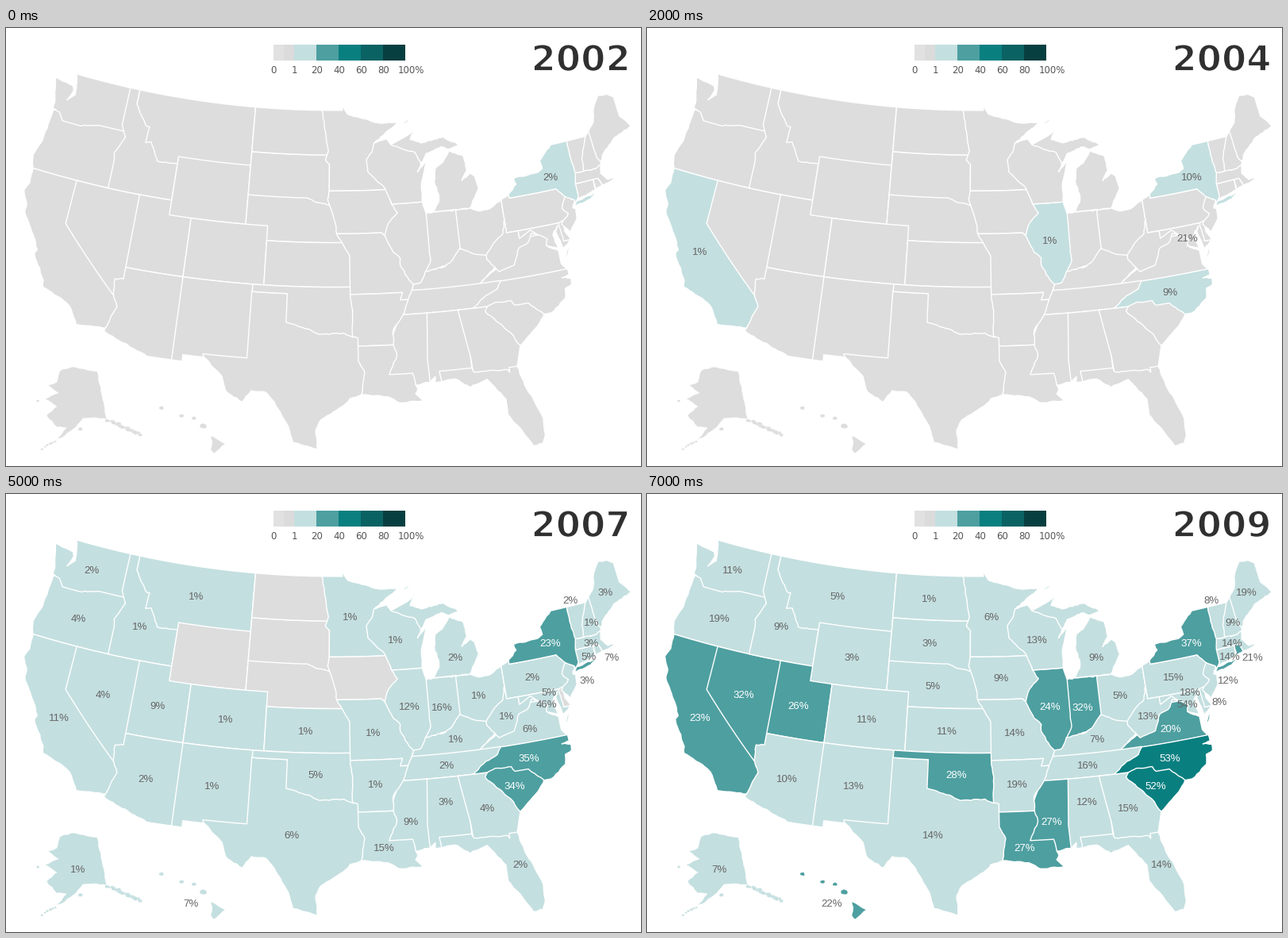
Recreate the animation shown at these times as a matplotlib script. Size 800 by 552 pixels, loop 8000 ms.

```python
import numpy as np
import matplotlib.pyplot as plt
from matplotlib.animation import FuncAnimation
from matplotlib.patches import Polygon, Rectangle
from matplotlib.patheffects import Normal, Stroke

W, H, DPI = 800, 552, 80
PX = 72 / DPI
YEARS = range(2002, 2010)
GREY = '#dddddd'
TEALS = ['#c4dfe0', '#4e9fa0', '#0a7f80', '#0a6263', '#073f40']
DARK_LABELS = {'RI', 'HI', 'DC'}

rng = np.random.default_rng(4)
fig = plt.figure(figsize=(W / DPI, H / DPI), dpi=DPI, facecolor='white')
ax = fig.add_axes([0, 0, 1, 1])
ax.set_xlim(0, W)
ax.set_ylim(H, 0)
ax.axis('off')

shapes, labels, shares = {}, {}, {}


def albers(west, lat):
    """Equal-area conic projection of degrees to stage pixels."""
    a, b = np.sin(np.radians([29.5, 45.5]))
    n = (a + b) / 2
    rho = np.sqrt(1 - a * a + 2 * n * a - 2 * n * np.sin(np.radians(lat))) / n
    theta = n * np.radians(96 - west)
    return 413.3 + 1060 * rho * np.sin(theta), -1064.2 + 1060 * rho * np.cos(theta)


def trace(points, unit, rough):
    """Subdivide an outline; sloping edges (coasts, rivers) become slightly ragged."""
    out = []
    for a, b in zip(points, np.roll(points, -1, 0)):
        n = 1 + int(np.hypot(*(b - a)) / (0.3 * unit))
        edge = a + (b - a) * np.arange(n)[:, None] / n
        if rough and (a != b).all():
            edge[1:] += rng.uniform(-0.04, 0.04, (n - 1, 2)) * unit
        out.append(edge)
    return np.vstack(out)


def land(name, *pts, flat=False, rough=True, edge=1.4):
    p = trace(np.reshape(pts, (-1, 2)).astype(float), 18 if flat else 1, rough)
    if not flat:
        p = np.column_stack(albers(p[:, 0], p[:, 1]))
    patch = Polygon(p, closed=True, ec='white', lw=edge * PX, joinstyle='round',
                    zorder=1 + len(ax.patches) / 1000)
    shapes.setdefault(name, []).append(ax.add_patch(patch))


def islet(name, x, y, r):
    turn = np.arange(0, 2 * np.pi, 0.9)
    rim = r * rng.uniform(0.75, 1.2, turn.size)
    pts = np.column_stack([x + rim * np.cos(turn), y + 0.75 * rim * np.sin(turn)])
    land(name, *pts.ravel(), flat=True, edge=0.2)


def chain(name, start, end, count, r):
    for t in np.linspace(0, 1, count):
        x, y = np.array(start) * (1 - t) + np.array(end) * t + rng.uniform(-1, 1, 2)
        islet(name, x, y, r * rng.uniform(0.7, 1.3))


def state(name, at, values, *pts, **kw):
    """Label position, the latest yearly shares, then the outline."""
    shares[name] = (0,) * (len(YEARS) - len(values)) + values
    labels[name] = ax.text(at[0], at[1] + 4.7, '', ha='center', va='baseline',
                           family='Liberation Sans', size=13.3 * PX, zorder=5)
    if pts:
        land(name, *pts, **kw)


def box(west, east, north, south):
    return west, north, east, north, east, south, west, south


# Outlines in degrees west and north; each state runs under those drawn after it.
state('OR', (91, 156), (4, 8, 19), 124.2, 42, 124.55, 42.85, 124.1, 44, 123.95, 46.2, 123.4, 46.3,
      116.5, 46.05, 116.5, 42)
state('WA', (108, 95), (2, 6, 11), 122.76, 49, 122.5, 48.5, 122.3, 47.6, 122.95, 47.1, 122.55, 47.9,
      122.75, 48.15, 124.72, 48.38, 124.1, 46.9, 124.05, 46.3, 123.3, 46.15, 122.8, 45.65,
      121.1, 45.65, 119, 46, 116.5, 46, 116.5, 49)
state('CA', (67, 281), (1, 4, 7, 11, 16, 23), 124.2, 42, 124.1, 41, 124.4, 40.4, 123.8, 39.6,
      123.75, 39, 122.5, 37.7, 121.8, 36.8, 121.95, 36.5, 120.62, 34.9, 120.5, 34.45, 118.8, 34.02,
      118, 33.65, 117.12, 32.53, 114.72, 32.72, 114.1, 34.3, 114.1, 35.5, 119.5, 42)
state('NV', (122, 252), (4, 11, 32), 120, 42, 114, 42, 114, 35.5, 114.63, 35, 120, 39, rough=False)
state('MT', (240, 128), (1, 3, 5), *box(116.05, 104.05, 49, 44.3))
state('ID', (169, 166), (1, 4, 9), 117.04, 49, 116.05, 49, 116.05, 48, 114.75, 46.7, 114.35, 46.65,
      114.45, 45.55, 113.9, 45.65, 113, 44.45, 111.05, 44.5, 111.05, 42, 117.03, 42,
      117.03, 43.8, 117.2, 44.4, 116.47, 45.6, 117.04, 46.4)
state('UT', (191, 266), (9, 19, 26), *box(114.05, 109.05, 42, 37))
state('AZ', (176, 358), (2, 6, 10), 114.05, 37, 108.5, 37, 108.5, 31.33, 111.07, 31.33,
      114.82, 32.5, 114.5, 33.4, 114.14, 34.27, 114.65, 35.1, 114.75, 36.1, 114.05, 36.2)
state('WY', (258, 205), (2, 3), *box(111.05, 104.05, 45, 41))
state('SD', (356, 187), (2, 3), *box(104.05, 96.45, 45.94, 42.4))
state('ND', (356, 131), (1, 1), *box(104.05, 96.3, 49, 45.94))
state('NE', (360, 241), (1, 5), 104.05, 43, 98.5, 43, 97.9, 42.8, 96.4, 42.5, 95, 42, 95, 40, 104.05, 40)
state('CO', (277, 283), (1, 6, 11), *box(109.05, 102.05, 41, 37))
state('NM', (260, 367), (1, 6, 13), 109.05, 37, 103, 37, 103, 31.78, 108.2, 31.78, 108.2, 31.33, 109.05, 31.33)
state('TX', (360, 429), (2, 6, 10, 14), 103.04, 36.5, 99.9, 36.5, 99.9, 35, 95, 34.2, 93.8, 33.4,
      93.4, 31, 93.84, 29.7, 94.75, 29.45, 95.1, 29.1, 97, 28, 97.4, 27.3, 97.25, 25.97,
      99.1, 26.4, 99.5, 27.5, 100.65, 29.1, 101.4, 29.77, 102.5, 29.8, 103.15, 28.98, 104.5, 29.65,
      104.9, 30.6, 106.6, 31.9, 106.6, 32, 103.04, 32)
state('KS', (378, 298), (1, 2, 11), *box(102.05, 94.3, 40, 37))
state('OK', (390, 353), (5, 13, 28), 103, 37, 94.4, 37, 94.4, 33.6, 95.2, 33.9, 97.2, 33.8,
      98.1, 34.15, 100, 34.56, 100, 36.5, 103, 36.5)
state('MN', (434, 154), (1, 3, 6), 97.23, 49, 95.15, 49, 95.15, 49.38, 94.6, 48.72, 91.5, 48.07,
      89.6, 48, 92.05, 46.7, 91.5, 45, 90.9, 43.5, 96.45, 43.5, 96.45, 45.3, 96.85, 45.6,
      96.55, 46.2, 96.85, 47.5)
state('IL', (508, 267), (1, 5, 9, 12, 18, 24), 91, 42.5, 87.8, 42.5, 87.53, 41.7, 87.2, 41.4,
      87.2, 38.5, 88.6, 36.95, 89.3, 36.95, 91.8, 40.5)
state('IA', (446, 231), (2, 9), 96.45, 43.5, 91.1, 43.5, 90.65, 42.5, 90.15, 41.9, 91.05, 41.2,
      91.42, 40.38, 91.73, 40.6, 95.77, 40.6, 95.85, 41.2, 96.4, 42.5, 96.6, 42.9)
state('WI', (491, 183), (1, 4, 13), 92.05, 46.7, 90.8, 46.95, 90.4, 46.55, 88, 46.3, 87.6, 45.1,
      88, 44.55, 87.05, 45.28, 87.7, 43.8, 87.8, 42.5, 90.65, 42.5, 91.2, 43.6, 92.75, 44.75,
      92.85, 45.6, 92.3, 46.1)
state('IN', (549, 268), (4, 16, 26, 32), 87.53, 41.68, 86.82, 41.76, 84.3, 41.7, 84.3, 38.5,
      88.05, 37.7, 87.5, 38.5, 87.53, 39.35)
state('OH', (596, 253), (1, 3, 5), 84.8, 41.7, 83.45, 41.73, 82.7, 41.45, 81.7, 41.5, 80.52, 41.98,
      80.52, 38.5, 82.4, 38.2, 84.8, 38.7)
state('MI', (566, 205), (2, 5, 9), 84.75, 45.77, 85.55, 45, 86.25, 44.7, 86.5, 43.8, 86.2, 42.9,
      86.25, 42.4, 86.82, 41.76, 84.8, 41.76, 83.45, 41.73, 82.42, 43, 82.65, 43.85, 83, 44.07,
      83.9, 43.65, 83.3, 44.3, 83.45, 45.3)
land('MI', 90.4, 46.55, 88.8, 47.05, 87.95, 47.47, 88.45, 46.8, 87.4, 46.5, 86.1, 46.67, 85.2, 46.75,
     84.6, 46.45, 83.6, 46.1, 84.75, 45.87, 85.5, 46.1, 87, 45.75, 87.6, 45.1, 88.1, 45.9, 89.1, 46.13)
land('MI', 89.2, 47.85, 88.4, 48.18, 88.8, 47.95, edge=0.3)
state('VA', (660, 295), (6, 15, 20), 83.68, 36.55, 75.87, 36.55, 76.3, 37, 76.3, 37.9, 77.25, 38.4,
      77.05, 38.8, 77.75, 39.25, 78.5, 39.4, 81.5, 37.6)
land('VA', 75.35, 38.02, 76, 37.2, 75.6, 37.5, edge=0.6)
state('KY', (567, 308), (1, 4, 7), 89.15, 37, 88.5, 37.1, 88.05, 37.8, 86.3, 38, 85.75, 38.27,
      84.85, 39.1, 83.7, 38.65, 82.6, 38.42, 82, 37.53, 83.68, 36.5, 89.42, 36.5)
state('TN', (555, 341), (2, 6, 16), *box(90.3, 81.68, 36.6, 35))
state('MS', (510, 412), (4, 9, 19, 27), 90.4, 35, 88, 35, 88.2, 30.37, 89.55, 30.18, 89.9, 30.9,
      91.7, 30.9, 91.3, 33.5)
state('AL', (554, 387), (1, 3, 6, 12), 88.2, 35, 85, 35, 85, 30.9, 87.4, 30.9, 87.5, 30.28,
      88, 30.25, 87.95, 30.65, 88.4, 30.35, 88.47, 31.9, rough=False)
state('GA', (606, 395), (4, 8, 15), 85.6, 35, 83, 35, 81.2, 33.2, 80.9, 32.05, 81.4, 30.7,
      82.05, 30.4, 84.9, 30.4, 85, 31.8, 85.2, 32.87, rough=False)
state('SC', (641, 367), (10, 24, 34, 42, 52), 83.1, 35, 82.2, 35.4, 79.3, 34.9, 78.55, 33.87,
      79.2, 33.2, 80.9, 32.05, 81.5, 33, 83.35, 34.7)
state('NC', (659, 332), (9, 17, 25, 35, 45, 53), 84.32, 35, 83.1, 35, 82.4, 35.2, 81.05, 35.15,
      80.8, 34.8, 79.67, 34.8, 78.55, 33.87, 77.95, 33.87, 76.55, 34.65, 76.4, 35.3, 75.8, 35.5,
      75.75, 35.9, 76.5, 36.05, 75.85, 36.15, 75.87, 36.57, 81.68, 36.57, 82.05, 36.1, 83.1, 35.75)
state('FL', (648, 466), (2, 8, 14), 87.6, 31, 85, 31, 84.86, 30.7, 82.2, 30.57, 82.05, 30.36,
      82.05, 30.7, 81.4, 30.7, 80.95, 29.1, 80.55, 28.3, 80.05, 26.9, 80.1, 25.8, 80.4, 25.2,
      81.1, 25.15, 81.9, 26.5, 82.65, 27.5, 82.65, 28.6, 83.9, 30.1, 85.3, 29.7, 86.4, 30.38, 87.5, 30.28)
state('MO', (463, 300), (1, 4, 14), 95.77, 40.6, 91.73, 40.6, 91.42, 40.38, 90.75, 39.25, 90.15, 38.8,
      90.2, 38.35, 89.5, 37.3, 89.15, 37, 89.7, 36, 90.37, 36, 90.15, 36.5, 94.62, 36.5, 94.62, 39.1)
state('AR', (466, 365), (1, 3, 19), 94.62, 36.5, 90.15, 36.5, 90.37, 36, 89.7, 36, 90.2, 35, 91.1, 34,
      91.15, 33, 94.04, 33, 94.04, 33.55, 94.48, 33.64, 94.43, 35.4)
state('LA', (476, 445), (3, 9, 15, 21, 27), 94.04, 33, 91.15, 33, 90.9, 32.3, 91.6, 31, 89.73, 31,
      89.55, 30.18, 89.4, 29.9, 89.6, 29.6, 89.05, 29.1, 90.9, 29.05, 91.8, 29.5, 93.84, 29.7,
      93.55, 31.2, 94.04, 32)
state('PA', (663, 230), (2, 11, 15), 80.52, 41.98, 79.76, 42.27, 79.76, 42, 75.35, 42, 74.5, 41.4,
      74.5, 40, 75.3, 39.72, 80.52, 39.72)
state('MD', (684, 249), (5, 12, 18), 79.48, 39.72, 75.6, 39.72, 75.6, 38.45, 75.05, 38.45,
      75.85, 37.95, 76.2, 39.2, 75.95, 39.55, 76.5, 39, 76.3, 38.05, 77.25, 38.4, 77.05, 38.8,
      77.72, 39.2, 79.48, 39.2)
state('WV', (631, 279), (1, 8, 13), 80.52, 40.64, 80.52, 39.72, 79.48, 39.72, 79.48, 39.2,
      78.4, 39.62, 77.8, 39.2, 78.35, 39.4, 78.87, 38.77, 79.65, 38.58, 80.3, 37.5, 81.68, 37.2,
      82.6, 38.15, 82.6, 38.42, 81.75, 39.2, 80.85, 39.7)
state('DC', (681, 264), (10, 21, 32, 39, 46, 51, 54))
state('DE', (721, 261), (4, 8), 75.79, 39.72, 75.4, 39.8, 75.4, 39.05, 75.05, 38.45, 75.7, 38.45)
state('NJ', (732, 234), (3, 8, 12), 74.7, 41.36, 73.9, 41, 74.25, 40.5, 74, 40.4, 74.1, 39.75,
      74.95, 38.95, 75.55, 39.6, 74.75, 40.2, 75.2, 40.65)
state('VT', (711, 133), (2, 3, 8), *box(73.4, 71.5, 45, 42.73))
state('NH', (738, 161), (1, 4, 9), 71.5, 45, 71.08, 45.3, 70.7, 44.5, 70.7, 43.07, 70.82, 42.7,
      72.45, 42.7, 72.35, 43.6)
state('ME', (755, 123), (3, 10, 19), 71.08, 45.3, 70.4, 45.8, 70, 46.7, 69.23, 47.46, 68.3, 47.35,
      67.79, 47.07, 67.79, 45.7, 66.97, 44.8, 68.8, 44.4, 70.2, 43.6, 70.7, 43.07, 70.97, 43.4)
state('MA', (737, 187), (3, 9, 14), 73.5, 42.73, 71.3, 42.7, 70.82, 42.87, 71, 42.3, 70.5, 41.77,
      70, 41.78, 70.2, 42.07, 69.95, 41.67, 71.12, 41.5, 71.38, 42.03, 73.5, 42.03)
state('CT', (734, 204), (5, 10, 14), 73.6, 42.03, 71.8, 42.03, 71.85, 41.32, 73.65, 41)
state('RI', (763, 205), (7, 16, 21), 71.8, 42.03, 71.38, 42.03, 71.15, 41.5, 71.85, 41.32)
state('NY', (686, 187), (2, 5, 10, 14, 17, 23, 30, 37), 79.76, 42.27, 78.9, 42.85, 79.05, 43.27,
      76.7, 43.35, 76.2, 43.55, 76.3, 44.1, 74.95, 45, 73.35, 45, 73.4, 44, 73.27, 42.75,
      73.5, 42.05, 73.5, 41.2, 73.9, 40.75, 73.95, 41, 74.7, 41.36, 75.35, 42, 79.76, 42)
land('NY', 74, 40.6, 73.75, 40.88, 71.9, 41.1, 72.5, 40.82, edge=0.6)

# Alaska and Hawaii are insets placed in stage pixels.
state('AK', (91, 472), (1, 4, 7), 83, 427, 115, 433, 127, 493, 110, 491, 97, 492, 88, 503, 74, 514,
      62, 520, 76, 504, 64, 503, 51, 488, 64, 477, 49, 467, 66, 460, 53, 450, 64, 446, 68, 432,
      flat=True, edge=0.6)
chain('AK', (128, 494), (169, 512), 16, 2.6)
chain('AK', (62, 521), (46, 530), 6, 1.8)
islet('AK', 94, 505, 3)
islet('AK', 40, 470, 2)
state('HI', (233, 515), (7, 15, 22), 258, 514, 276, 524, 262, 536, 258, 531, 260, 521, flat=True, edge=0.3)
for x, y, r in [(196, 479, 3), (221, 489, 3.2), (237, 492, 3), (249, 502, 4.6)]:
    islet('HI', x, y, r)

# Legend: two half-width greys, then the five teal steps.
for i, color in enumerate(['#e1e1e1', '#dbdbdb'] + TEALS):
    x, w = (337 + 13 * i, 13) if i < 2 else (363 + 28 * (i - 2), 28)
    ax.add_patch(Rectangle((x, 21), w, 20, fc=color, lw=0))
for i, text in enumerate(['0', '1', '20', '40', '60', '80', '100%']):
    x = 363.5 + 28 * (i - 1) if i else 337
    ax.text(x + 7 * (text == '100%'), 57, text, ha='center', va='baseline',
            family='DejaVu Sans', size=11.8 * PX, color='#555555')

year = ax.text(786.5, 54, '', ha='right', va='baseline', family='DejaVu Sans', weight='bold',
               size=45 * PX, color='#303030')
year.set_path_effects([Normal(), Stroke(linewidth=1.8 * PX, foreground='white')])


def fill(value):
    return TEALS[value // 20] if value else GREY


def draw(i):
    year.set_text(str(YEARS[i]))
    for name, label in labels.items():
        value = shares[name][i]
        for patch in shapes.get(name, []):
            patch.set_facecolor(fill(value))
        label.set_text(f'{value}%' if value else '')
        label.set_color('white' if value >= 20 and name not in DARK_LABELS else '#666666')
    return []


anim = FuncAnimation(fig, draw, frames=len(YEARS), interval=1000, repeat=True, repeat_delay=0)
plt.show()
```
